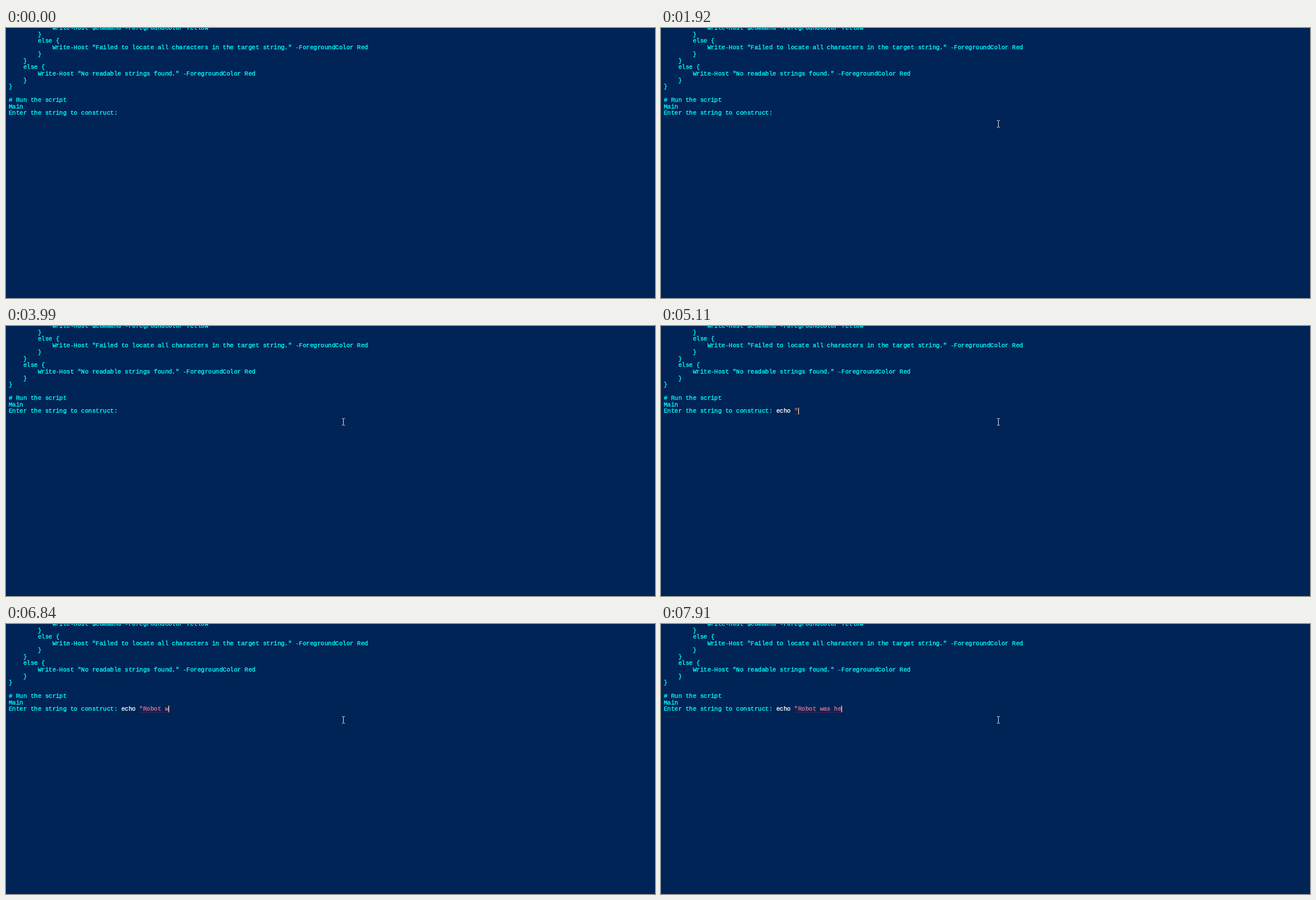
Write an HTML page with a canvas that moves like this. It is 1159x483 px and loops after 8000 ms.

```html
<!DOCTYPE html>
<html lang="en">
<head>
<meta charset="utf-8">
<title>Console</title>
<style>
  html, body { margin: 0; width: 100%; height: 100%; overflow: hidden; background: #012456; }
  canvas { display: block; }
</style>
</head>
<body>
<canvas id="stage" width="1159" height="483"></canvas>
<script>
const ctx = document.getElementById('stage').getContext('2d');
const LOOP = 8000;
const LEFT = 4.7, ADVANCE = 6.484, BASE = 155.3, PITCH = 11.72;
const BACK = '#012456', CYAN = '#00ffff', COMMAND = '#f0ffff', STRING = '#db7093';
const CARET = '#fedba9', POINTER = '#e4e8ee', UNDERLINE = '#2c2250';

const lines = [
  '            Write-Host $command -ForegroundColor Yellow',
  '        }',
  '        else {',
  '            Write-Host "Failed to locate all characters in the target string." -ForegroundColor Red',
  '        }',
  '    }',
  '    else {',
  '        Write-Host "No readable strings found." -ForegroundColor Red',
  '    }',
  '}',
  '',
  '# Run the script',
  'Main',
  'Enter the string to construct: '
];
const LAST = lines.length - 1;
const PROMPT = lines[LAST].length;
const QUOTE = PROMPT + 5;

// [time, keys]; '<' is a backspace
const keys = [
  [4250, 'e'], [4380, 'c'], [4450, 'h'], [4580, 'o'], [4780, ' '], [5110, '"'],
  [5570, 'R'], [5640, 'o'], [5770, 'b'], [5900, 'ot'], [6040, 's'], [6110, ' '],
  [6570, '<'], [6640, '<'], [6700, ' '], [6840, 'w'], [6970, 'a'], [7040, 's'],
  [7110, ' '], [7180, 'h'], [7380, 'e'], [7580, 'r'], [7910, '<']
];
const blinks = [330, 860, 1390, 1920, 2450, 2910, 3460, 3990, 4250];

// [time, x, y]
const pointerPath = [
  [70, 1101, 473], [140, 1008, 408], [200, 885, 328], [270, 765, 250],
  [330, 668, 197], [400, 633, 180], [530, 622, 178], [600, 602, 172]
];

const colX = col => Math.round(LEFT + col * ADVANCE);

// A thin outline gives the letters their heavier weight
function drawText(text, col, row, color) {
  const y = Math.round(BASE - (LAST - row) * PITCH);
  ctx.fillStyle = ctx.strokeStyle = color;
  [...text].forEach((ch, i) => {
    if (ch === ' ') return;
    ctx.fillText(ch, colX(col + i), y);
    ctx.strokeText(ch, colX(col + i), y);
  });
}

function typedAt(t) {
  let text = '';
  for (const [time, input] of keys) {
    if (time > t) break;
    text = input === '<' ? text.slice(0, -1) : text + input;
  }
  return text;
}

function drawInput(typed) {
  const end = PROMPT + typed.length;
  if (end > QUOTE) {
    ctx.fillStyle = UNDERLINE;
    ctx.fillRect(colX(QUOTE), 157, colX(end) - colX(QUOTE), 2);
  }
  drawText(typed.slice(0, 5), PROMPT, LAST, COMMAND);
  drawText(typed.slice(5), QUOTE, LAST, STRING);
}

function drawCaret(col) {
  ctx.fillStyle = CARET;
  ctx.fillRect(colX(col), 146, 1.25, 12);
}

function drawPointer(x, y) {
  ctx.fillStyle = POINTER;
  for (const edge of [y - 7, y + 5]) {
    ctx.fillRect(x - 2, edge, 2, 1);
    ctx.fillRect(x + 1, edge, 2, 1);
  }
  ctx.fillRect(x, y - 6, 1, 11);
}

function render(t) {
  ctx.fillStyle = BACK;
  ctx.fillRect(0, 0, 1159, 483);
  ctx.font = '10.8px "Liberation Mono", monospace';
  ctx.textBaseline = 'alphabetic';
  ctx.lineWidth = 0.35;
  ctx.lineJoin = 'round';
  lines.forEach((line, row) => drawText(line, 0, row, CYAN));

  const typed = typedAt(t);
  drawInput(typed);
  if (blinks.filter(b => b <= t).length % 2) drawCaret(PROMPT + typed.length);

  const spot = pointerPath.filter(p => p[0] <= t).pop();
  if (spot) drawPointer(spot[1], spot[2]);
}

const start = performance.now();
function tick() {
  render((performance.now() - start) % LOOP);
  requestAnimationFrame(tick);
}
tick();
</script>
</body>
</html>
```
